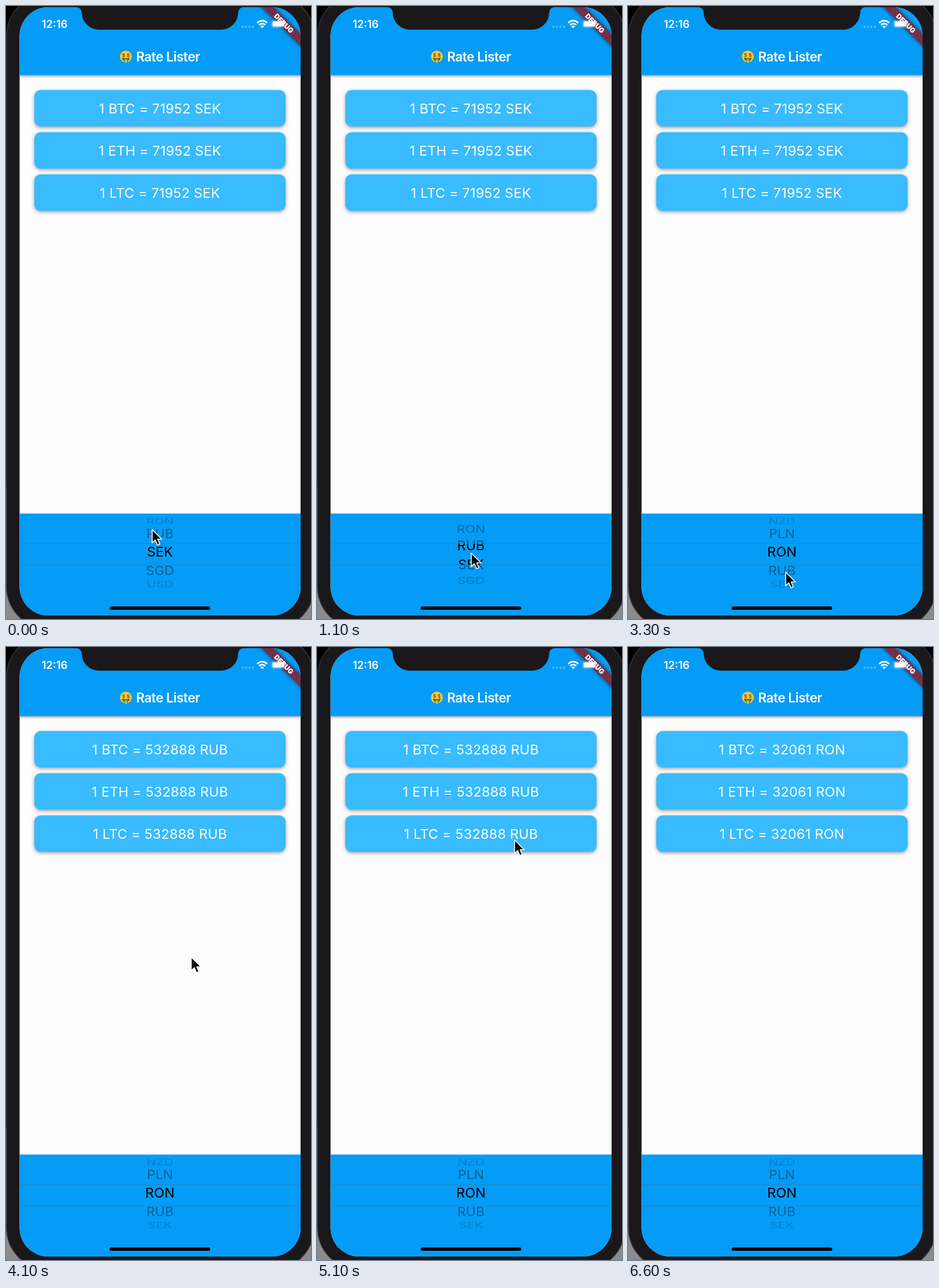
Write an HTML page that moves like this. It is 528x1061 px and loops after 6700 ms.

```html
<!DOCTYPE html>
<html lang="en">
<head>
<meta charset="utf-8">
<style>
  html, body { margin: 0; width: 100%; height: 100%; overflow: hidden; background: #000; }
  svg { display: block; width: 100%; height: 100%; }
  text { font-family: Inter, Roboto, sans-serif; font-size: 23.5px; text-anchor: middle; }
  .card { fill: #38bbff; filter: drop-shadow(0 2.5px 3px #0006); }
  .bar { fill: #049cf6; }
  #cards text { fill: #fff; letter-spacing: .2px; }
</style>
</head>
<body>
<svg viewBox="0 0 528 1061">
  <defs>
    <clipPath id="screen"><rect x="23.5" y="2" width="486.5" height="1053" rx="50"/></clipPath>
    <clipPath id="band"><rect x="24" y="930.5" width="486" height="36.5"/></clipPath>
    <clipPath id="around"><path d="M24 879H510V930.5H24ZM24 967H510V1020H24Z"/></clipPath>
  </defs>

  <rect y="832" width="528" height="229" fill="#8b8a8c"/>
  <rect x="1" y="-21" width="532" height="1099" rx="73" fill="#1a181b" stroke="#343236" stroke-width="1.5"/>

  <g clip-path="url(#screen)">
    <rect width="528" height="1061" fill="#fefdfe"/>
    <rect class="bar" x="23" width="488" height="119.5" style="filter:drop-shadow(0 2px 2px #0006)"/>
    <rect class="bar" x="23" y="878.5" width="488" height="183"/>

    <g transform="translate(207.5 87.5)">
      <circle r="10.3" fill="#fbc537"/>
      <path d="M-6.5 2Q0 4 6.5 2Q5.5 8 0 8T-6.5 2Z" fill="#6b3a12"/>
      <path d="M-3.6 4H3.6V9Q0 12.5-3.6 9Z" fill="#5f9b45"/>
      <g fill="#5a4a14" style="font-weight:600">
        <text x="-4" y="0" style="font-size:8px">$</text><text x="4" y="0" style="font-size:8px">$</text>
        <text y="10" style="font-size:6px" fill="#dff0c8">$</text>
      </g>
    </g>
    <text x="280.5" y="95.5" fill="#fff" style="font-size:22.5px;font-weight:600;letter-spacing:-.4px">Rate Lister</text>

    <g id="cards"></g>

    <g id="dim" clip-path="url(#around)"></g>
    <g id="lit" clip-path="url(#band)"></g>
    <path d="M24 930.5H510M24 967.5H510" stroke="#42708f" stroke-opacity=".5"/>
    <rect x="179.5" y="1039.3" width="174" height="5.8" rx="2.9"/>

    <g transform="translate(481 30) rotate(45)">
      <rect x="-70" y="-7.2" width="140" height="14.4" fill="#742f49" style="filter:drop-shadow(0 0 3px #0009)"/>
      <text y="4.3" fill="#fff" style="font-size:12px;font-weight:900">DEBUG</text>
    </g>

    <!-- The system status bar lies above the app and its ribbon -->
    <text x="84.2" y="38" fill="#fff" style="font-size:18.5px;font-weight:600">12:16</text>
    <g fill="#fff">
      <g opacity=".3"><circle cx="409.5" cy="36" r="2"/><circle cx="415.5" cy="36" r="2"/><circle cx="421.5" cy="36" r="2"/><circle cx="427.5" cy="36" r="2"/></g>
      <path d="M434.8 29.2Q443.5 21.6 452.2 29.2M438 32.8Q443.5 28 449 32.8" fill="none" stroke="#fff" stroke-width="2.7"/>
      <path d="M440.2 35Q443.5 32.3 446.8 35L443.5 38.4Z"/>
      <rect x="459.5" y="24.5" width="24" height="13" rx="3.8" fill="none" stroke="#fff" stroke-opacity=".4"/>
      <rect x="461.3" y="26.2" width="20.4" height="9.6" rx="2.4"/>
      <path d="M485.2 29v4q2-2 0-4" opacity=".5"/>
    </g>
  </g>
  <path d="M122 0V2A9 9 0 0 1 131 11A30 30 0 0 0 161 41H372A30 30 0 0 0 402 11A9 9 0 0 1 411 2V0Z" fill="#1a181b"/>

  <path id="cursor" d="M0 0V23.3L5.3 18.4L9.2 27L13.2 25.2L9.5 16.8H16.8Z" stroke="#fff" stroke-width="1.6" stroke-linejoin="round"/>
</svg>

<script>
const LOOP = 6700, STEP = 100;
const MID = 266.5, CAP = 8.5;
const $ = id => document.getElementById(id);

function add(parent, tag, attrs, label = '') {
  const el = document.createElementNS('http://www.w3.org/2000/svg', tag);
  for (const k in attrs) el.setAttribute(k, attrs[k]);
  el.textContent = label;
  parent.append(el);
  return el;
}

const cards = ['BTC', 'ETH', 'LTC'].map((coin, i) => {
  const y = 145.5 + 73 * i;
  add($('cards'), 'rect', { class: 'card', x: 49, y, width: 435, height: 63, rx: 11.5 });
  return { coin, label: add($('cards'), 'text', { x: MID, y: y + 40 }) };
});

const items = ['NZD', 'PLN', 'RON', 'RUB', 'SEK', 'SGD', 'USD'].map(code =>
  ['dim', 'lit'].map(id => add($(id), 'text', { y: CAP }, code)));

// Linear track through [time, ...values] keys
function track(keys, t) {
  const n = keys.findIndex(k => k[0] > t);
  if (n < 0) return keys[keys.length - 1].slice(1);
  if (!n) return keys[0].slice(1);
  const a = keys[n - 1], b = keys[n], u = (t - a[0]) / (b[0] - a[0]);
  return a.slice(1).map((v, i) => v + (b[i + 1] - v) * u);
}

const scroll = [[600, 4], [800, 3.8], [1100, 3.33], [1500, 2.65], [1900, 2.24], [2100, 2.08], [2400, 2]];
const pointer = [[500, 253, 906], [1100, 267, 947], [1600, 273, 980], [3600, 273, 980],
  [3900, 298, 770], [4200, 332, 420], [4400, 342, 334]];
const HIDE = 5200;

// Cylindrical wheel with perspective; rows are dimmed outside the band
const CENTER = 948.7, RADIUS = 75.4, ANGLE = 0.444, SHIFT = -3.8;

function drawWheel(pos) {
  items.forEach(([dim, lit], i) => {
    const off = i - pos, a = off * ANGLE, c = Math.cos(a);
    const s = 1 / (1 + 0.192 * (1 - c));
    const y = CENTER + s * (RADIUS * Math.sin(a) + SHIFT * c);
    for (const el of [dim, lit])
      el.setAttribute('transform', `translate(${MID} ${y}) scale(${s} ${s * c})`);
    dim.setAttribute('opacity', Math.abs(off) < 2.3 ? 0.47 * c ** 2.3 : 0);
  });
}

function draw(t) {
  const price = t < 3900 ? '71952 SEK' : t < 5300 ? '532888 RUB' : '32061 RON';
  for (const { coin, label } of cards) label.textContent = `1 ${coin} = ${price}`;
  drawWheel(track(scroll, t)[0]);
  $('cursor').setAttribute('transform', `translate(${track(pointer, t)})`);
  $('cursor').setAttribute('visibility', t < HIDE ? 'visible' : 'hidden');
}

const start = performance.now();
function tick() {
  const t = (performance.now() - start) % LOOP;
  draw(Math.floor(t / STEP) * STEP);
  requestAnimationFrame(tick);
}
tick();
</script>
</body>
</html>
```
